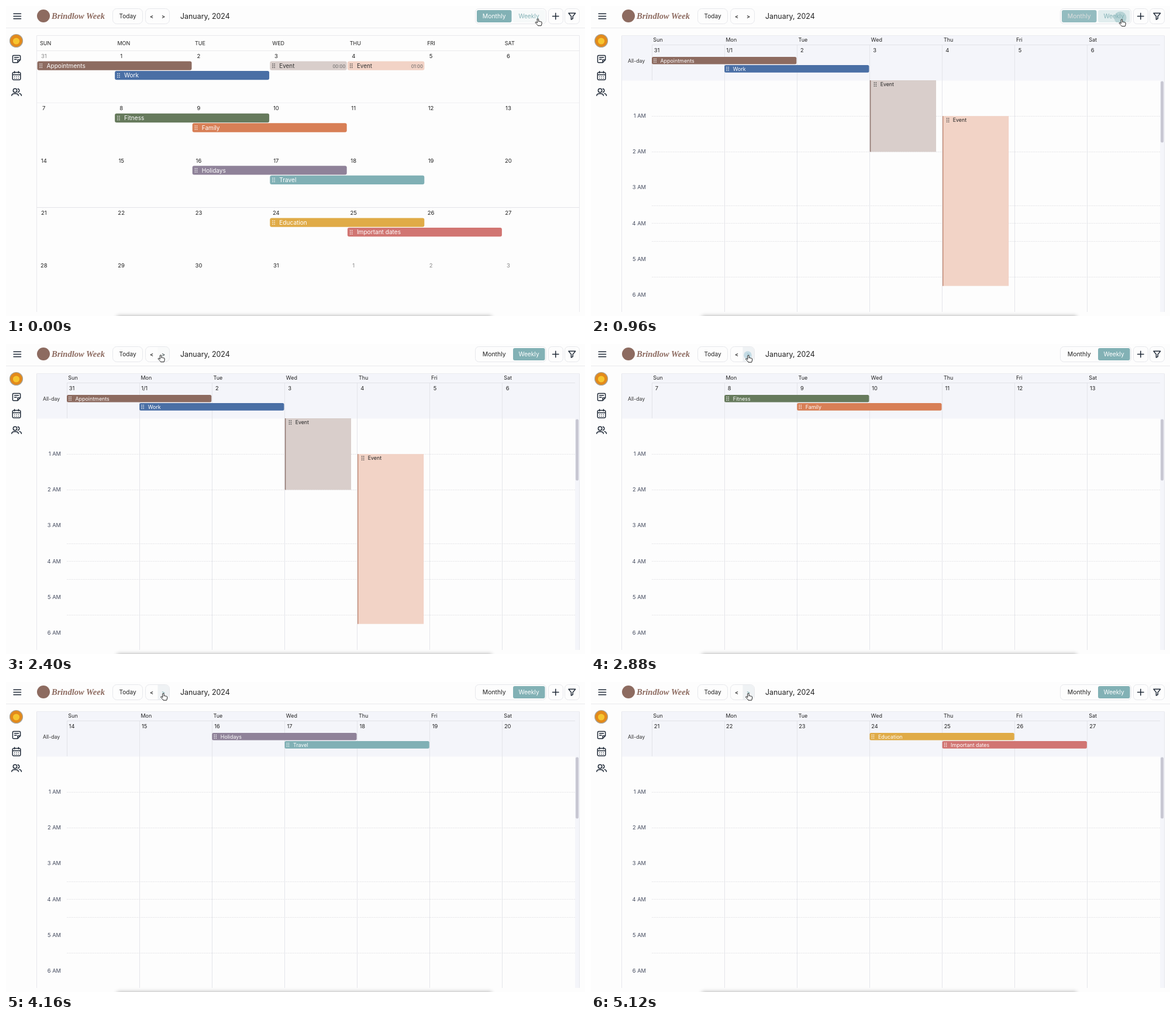
An HTML page that plays this animation: 990 px wide and 530 px high, repeating every 5520 ms.

```html
<!DOCTYPE html>
<html lang="en">
<head>
<meta charset="utf-8">
<title>Calendar</title>
<style>
  html, body { margin: 0; width: 100%; height: 100%; overflow: hidden; background: #fdfdfd; }
  svg { display: block; width: 990px; height: 530px; font-family: Inter, "Open Sans", sans-serif; }
  .icon { fill: none; stroke: #1f2937; stroke-width: 1.5; stroke-linecap: round; stroke-linejoin: round; }
  .btn { fill: #fdfdfd; stroke: #e7e8ec; }
  .mid { text-anchor: middle; }
  .brand { font: italic bold 14.5px "Liberation Serif", serif; }
</style>
</head>
<body>
<svg id="stage" viewBox="0 0 990 530" xmlns="http://www.w3.org/2000/svg">
  <defs>
    <clipPath id="nextClip"><path d="M259.5 5H273a6 6 0 0 1 6 6V24a6 6 0 0 1-6 6H259.5Z"/></clipPath>
    <clipPath id="weekClip"><rect x="867" y="7" width="54.5" height="21" rx="3"/></clipPath>
    <filter id="soft" x="-10%" y="-100%" width="120%" height="300%"><feGaussianBlur stdDeviation="3.5"/></filter>
  </defs>
  <rect width="990" height="530" fill="#fdfdfd"/>
  <g id="month"></g>
  <g id="week"></g>

  <g id="header">
    <path d="M0 37.5H990" stroke="#e9e9ec"/>
    <path class="icon" d="M13 13.2H25.5M13 17.5H25.5M13 21.8H25.5"/>
    <circle cx="64" cy="17" r="11" fill="#8d6b60"/>
    <text class="brand" x="78" y="22" fill="#8d6b60">Brindlow Week</text>
    <rect class="btn" x="182.5" y="4.5" width="51" height="26" rx="7"/>
    <text class="mid" x="208" y="21.3" font-size="10.1" fill="#222">Today</text>
    <rect class="btn" x="238.5" y="4.5" width="41" height="26" rx="7"/>
    <g clip-path="url(#nextClip)">
      <rect id="nextBg" x="259" y="4" width="21" height="27" fill="#eff2f4"/>
    </g>
    <text class="mid" x="249" y="21" font-size="9" font-weight="600" fill="#222">&lt;</text>
    <text id="nextText" class="mid" x="269" y="21" font-size="9" font-weight="600">&gt;</text>
    <g clip-path="url(#nextClip)"><circle id="nextRipple" cx="268" cy="19" fill="#a9cddb"/></g>
    <text x="298" y="22" font-size="12.4" fill="#222">January, 2024</text>

    <rect class="btn" x="802.5" y="4.5" width="121" height="26" rx="6"/>
    <rect id="monthBtn" x="805" y="7" width="59.5" height="21" rx="3"/>
    <text id="monthText" class="mid" x="834.7" y="21.3" font-size="10.4">Monthly</text>
    <rect id="weekBtn" x="867" y="7" width="54.5" height="21" rx="3"/>
    <text id="weekText" class="mid" x="894" y="21.3" font-size="10.2">Weekly</text>
    <g clip-path="url(#weekClip)"><circle id="weekRipple" cx="905" cy="20" fill="#82b1b5"/></g>

    <rect class="btn" x="927.5" y="4.5" width="25" height="26" rx="6"/>
    <path class="icon" d="M934.5 17.5H945M939.8 12.2V22.8"/>
    <rect class="btn" x="955.5" y="4.5" width="25" height="26" rx="6"/>
    <path class="icon" stroke-width="1.3" d="M962 12.2H973.6L969.2 17.6V21.6L966.4 23.2V17.6Z"/>
  </g>

  <g id="sidebar">
    <circle cx="17.5" cy="59.5" r="11" fill="#e38a1b" stroke="#a9a49a" stroke-width="1.2"/>
    <circle cx="17.5" cy="60" r="5.6" fill="#f6c52f"/>
    <path class="icon" d="M13 84.5H23A1.6 1.6 0 0 1 24.6 86V92L20 96.8H13A1.6 1.6 0 0 1 11.4 95.2V86A1.6 1.6 0 0 1 13 84.5ZM24.6 92H20V96.8M14.5 88H21.5M14.5 91.3H18"/>
    <path class="icon" d="M13.2 113.5H22.8A1.8 1.8 0 0 1 24.8 115.3V124.3A1.8 1.8 0 0 1 22.8 126.2H13.2A1.8 1.8 0 0 1 11.2 124.3V115.3A1.8 1.8 0 0 1 13.2 113.5ZM11.2 117.5H24.8M14.6 111.8V114.5M21.4 111.8V114.5"/>
    <path class="icon" stroke-dasharray="0 3.3" d="M14.7 120.5H22M14.7 123.4H22"/>
    <circle class="icon" cx="15.5" cy="144.5" r="3.2"/>
    <path class="icon" d="M9.8 153.2C9.8 148.7 21.2 148.7 21.2 153.2M20.3 141.4A3.2 3.2 0 0 1 20.3 147.6M23 149.4C25.2 150 26.3 151.3 26.4 153.2"/>
  </g>

  <rect x="190" y="530" width="640" height="20" fill="#000" opacity=".33" filter="url(#soft)"/>

  <g id="cursor" stroke-linejoin="round">
    <path id="hand" fill="#fff" stroke="#111" stroke-width=".95" d="M-1.2 1a1.2 1.2 0 0 1 2.4 0V4.6c.4-.9 1.9-.7 2 .2c.5-.7 1.7-.5 1.8.4c.6-.5 1.6-.2 1.6.8V8.3c0 1.5-.9 2-1 3.4H0C-.5 10-3 8.6-4.2 6.6c-.6-1 .6-1.8 1.5-1L-1.2 7Z"/>
    <path id="arrow" fill="#111" stroke="#fff" stroke-width=".8" d="M0 0V9.5L2.2 7.5L3.7 11L5.3 10.3L3.9 6.9H6.8Z"/>
  </g>
</svg>

<script>
const LOOP = 5520, STEP = 80;
const OPEN_WEEK = 880, CLICKS = [2800, 3520, 4480];
const TEAL = [130, 177, 181], PALE = [225, 237, 238], PAPER = [253, 253, 253], INK = [34, 34, 34], WHITE = [255, 255, 255];
const DAYS = ["Sun", "Mon", "Tue", "Wed", "Thu", "Fri", "Sat"];

// week, line, first column, name, colour; each bar spans two days
const BARS = [
  [0, 0, 0, "Appointments", "#8d6b60"], [0, 1, 1, "Work", "#4a6fa5"],
  [1, 0, 1, "Fitness", "#667a5c"], [1, 1, 2, "Family", "#d87f56"],
  [2, 0, 2, "Holidays", "#8f8299"], [2, 1, 3, "Travel", "#80b0b5"],
  [3, 0, 3, "Education", "#e0ab47"], [3, 1, 4, "Important dates", "#d17572"]
];
// column, start hour, end hour, time, fill, edge
const EVENTS = [
  [3, 0, 2, "00:00", "#d9cecb", "#927870"],
  [4, 1, 5.75, "01:00", "#f2d3c6", "#c58f7b"]
];

const $ = id => document.getElementById(id);
const set = (id, attrs) => { for (const k in attrs) $(id).setAttribute(k, attrs[k]); };
const clamp = v => Math.max(0, Math.min(1, v));
const ramp = (t, a, b) => clamp((t - a) / (b - a));
const mix = (a, b, k) => `rgb(${a.map((v, i) => Math.round(v + (b[i] - v) * k))})`;

const rect = (x, y, w, h, fill, r = 0) => `<rect x="${x}" y="${y}" width="${w}" height="${h}" rx="${r}" fill="${fill}"/>`;
const line = (d, color, extra = "") => `<path d="${d}" fill="none" stroke="${color}" ${extra}/>`;
const text = (x, y, size, fill, str, anchor = "start") =>
  `<text x="${x}" y="${y}" font-size="${size}" fill="${fill}" text-anchor="${anchor}">${str}</text>`;

function grip(x, y, fill, gap = 3) {
  let out = "";
  for (let i = 0; i < 6; i++)
    out += rect(x + (i % 2) * 3 - .7, y + ((i >> 1) - 1) * gap - .7, 1.4, 1.4, fill);
  return out;
}

function monthView() {
  let out = line("M52.5 523V50.5H980.5V523", "#e8e8ec") + line("M53 76.5H980", "#e9e9ec")
    + line("M53 165.5H980", "#f0f0f2") + line("M53 344.5H980", "#e4e4e8");
  DAYS.forEach((d, i) => out += text(58 + 132.45 * i, 67.2, 9, "#222", d.toUpperCase()));
  for (let i = 0; i < 35; i++) {
    const day = (i + 30) % 31 + 1, outside = i === 0 || i > 31;
    out += text(64.8 + 132.35 * (i % 7), 89 + 89.4 * Math.floor(i / 7), 9.5, outside ? "#8a8a8a" : "#222", day, "middle");
  }
  const left = c => 53.5 + 132.6 * c;
  for (const [w, slot, c, name, color] of BARS) {
    const x = left(c), y = 94.5 + 89.35 * w + 16.5 * slot;
    out += rect(x, y, 264, 15.3, color, 3) + grip(x + 4.8, y + 7.7, "#fff") + text(x + 16, y + 11.4, 10.1, "#fff", name);
  }
  for (const [c, , , time, fill] of EVENTS) {
    const x = left(c);
    out += rect(x, 94.5, 131.5, 15.3, fill, 3) + grip(x + 4.8, 102.2, "#333")
      + text(x + 16, 105.9, 9.9, "#333", "Event") + text(x + 129, 105.7, 7.8, "#666", time, "end");
  }
  return out;
}

function weekView(week) {
  const left = c => 104 + 124.15 * c, tint = "#f4f5fa", hour = h => 127 + 61.15 * h;
  let out = rect(53, 50.5, 927.5, 77, tint) + rect(973, 127, 7.5, 396, tint)
    + line("M52.5 50.5V523M980.5 50.5V523", "#e6e7ec") + line("M53 50.5H980", "#ececf1")
    + line("M104 66.5H973", "#e1e2e8") + line("M104.5 67V127", "#e1e2e8");
  for (const y of [188.5, 249.5, 341.5, 371.5, 402.5, 463.5])
    out += line(`M104 ${y}H973`, "#e6e6e9", 'stroke-dasharray="2 1"');
  DAYS.forEach((d, i) => {
    const n = (30 + 7 * week + i) % 31 + 1;
    if (i) out += line(`M${Math.floor(left(i)) + .5} 67V523`, "#e4e5ea");
    out += text(106.3 + 124.15 * i, 60.8, 9, "#222", d)
      + text(112.5 + 124.2 * i, 79.4, 9.3, "#222", week === 0 && i === 1 ? "1/1" : n, "middle");
  });
  out += text(63, 96.6, 8.7, "#333", "All-day");
  for (let h = 1; h < 7; h++) out += text(94, hour(h) + 2.9, 9.3, "#464d60", h + " AM", "end");
  for (const [w, slot, c, name, color] of BARS) if (w === week) {
    const x = left(c), y = 87 + 14.1 * slot;
    out += rect(x, y, 247.3, 12.6, color, 2.5) + grip(x + 4, y + 6.3, "#fff", 2.8) + text(x + 14.5, y + 9.5, 8.9, "#fff", name);
  }
  if (week === 0) for (const [c, a, b, , fill, edge] of EVENTS) {
    const x = left(c) + .4, y = hour(a), h = hour(b) - y;
    out += rect(x, y, 113.2, h, fill) + rect(x, y, 1.5, h, edge)
      + grip(x + 7.6, y + 7, "#333") + text(x + 17.8, y + 10.2, 8.8, "#222", "Event");
  }
  return out + rect(974, 128.5, 5, 105, "#c8c8d3", 2.5);
}

function cursorAt(t) {
  if (t < 480) return [909.5, 22];
  if (t < 1280) return [909.5 - 2 * ramp(t, 480, 880), 22 + ramp(t, 480, 880)];
  if (t < 1760) {
    const k = ramp(t, 1280, 1760) ** 2;
    return [907.5 - 317 * k, 23 - 11.5 * k];
  }
  if (t < 2400) {
    const k = 1 - (1 - ramp(t, 1760, 2400)) ** 2;
    return [590.5 - 326 * k, 11.5 + 7.5 * k];
  }
  const k = ramp(t, 2400, 2640);
  return [264.5 + 4.5 * k, 19 + .5 * k];
}

function ripple(id, age, alpha) {
  const p = clamp((age + 40) / 640), on = age >= 0 && age < 560;
  set(id, { r: on ? 20 * (1 - (1 - p) ** 2) : 0, opacity: alpha * (1 - ramp(age, 240, 560)) });
}

let shownWeek = -1;
function draw(t) {
  const monthly = t < OPEN_WEEK;
  const week = CLICKS.filter(c => t >= c + STEP).length;
  set("month", { display: monthly ? "inline" : "none" });
  set("week", { display: monthly ? "none" : "inline" });
  if (week !== shownWeek) {
    $("week").innerHTML = weekView(week);
    shownWeek = week;
  }

  const swap = ramp(t, 840, 1160), hover = ramp(t, -80, 240);
  set("monthBtn", { fill: mix(TEAL, PAPER, swap < .5 ? swap * .4 : swap) });
  set("monthText", { fill: mix(WHITE, INK, swap < .5 ? swap * .4 : swap) });
  set("weekBtn", { fill: swap < .5 ? mix(PAPER, PALE, hover) : mix(PALE, TEAL, swap * 2 - 1) });
  set("weekText", { fill: mix(TEAL, WHITE, ramp(swap, .5, 1)) });
  ripple("weekRipple", t - 800, .45);

  const next = ramp(t, 2320, 2560);
  set("nextBg", { opacity: next });
  set("nextText", { fill: mix(INK, TEAL, next) });
  const last = CLICKS.filter(c => t >= c).pop();
  ripple("nextRipple", last === undefined ? -1 : t - last, .6);

  const [x, y] = cursorAt(t);
  const overButton = x > 802 || x < 280;
  set("cursor", { transform: `translate(${x} ${y})` });
  set("hand", { display: overButton ? "inline" : "none" });
  set("arrow", { display: overButton ? "none" : "inline" });
}

$("month").innerHTML = monthView();
const start = performance.now();
function tick() {
  const t = (performance.now() - start) % LOOP;
  draw(Math.floor(t / STEP) * STEP);
  requestAnimationFrame(tick);
}
tick();
</script>
</body>
</html>
```
